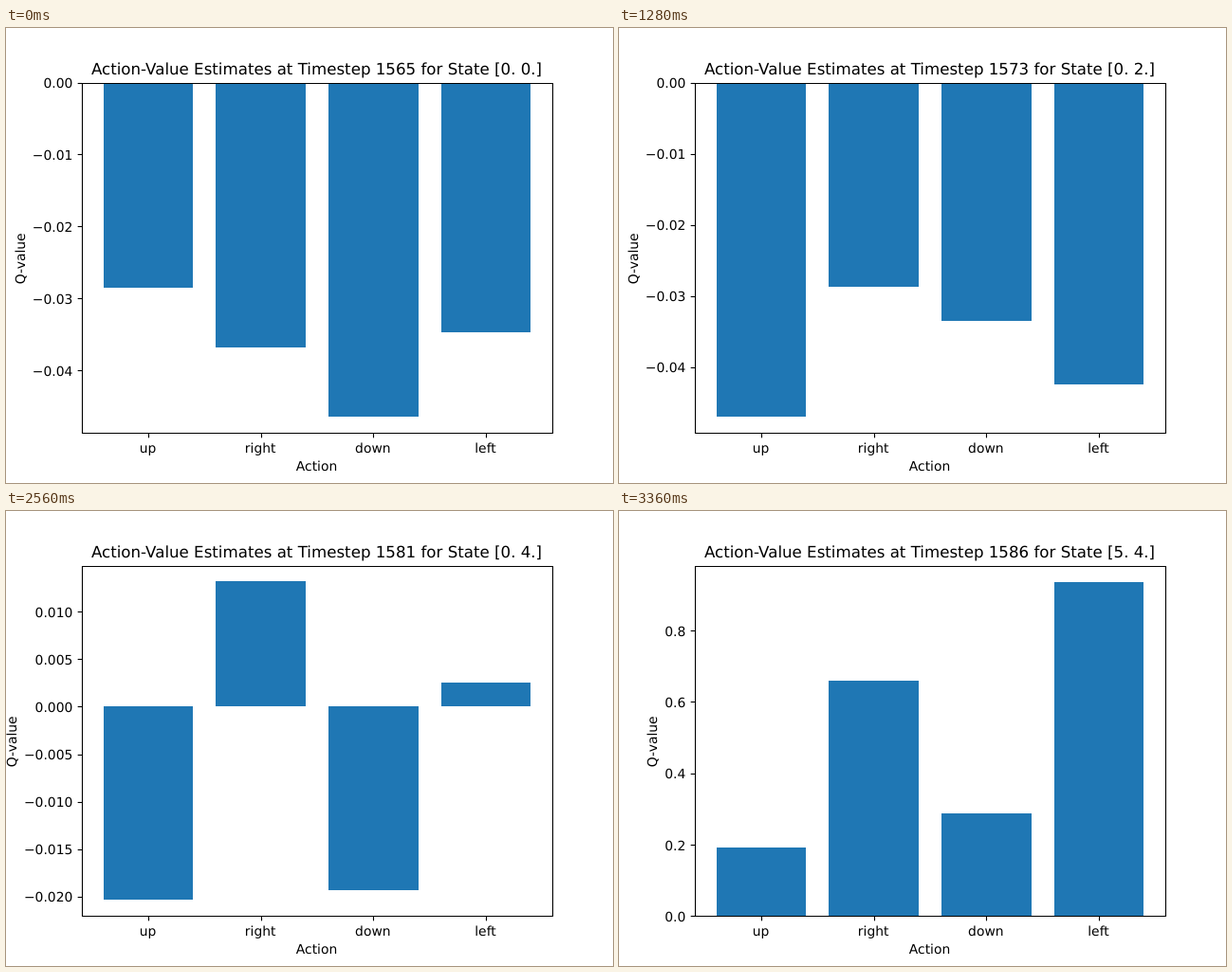
An HTML page that plays this animation: 640x480 px, repeating every 3520 ms.

```html
<!DOCTYPE html>
<html lang="en">
<head>
<meta charset="utf-8">
<title>Action values</title>
<style>
  html, body { margin: 0; width: 100%; height: 100%; overflow: hidden; background: #fff; }
  svg { display: block; width: 640px; height: 480px; }
  text { font: 13.889px "DejaVu Sans", sans-serif; text-rendering: geometricPrecision; }
  .title { font-size: 16.667px; }
  .mid { text-anchor: middle; }
  .end { text-anchor: end; }
  .line { fill: none; stroke: #000; stroke-width: 1.11; }
  .bar { fill: #1f77b4; }
</style>
</head>
<body>
<svg id="chart" viewBox="0 0 640 480"></svg>
<script>
const STEP_MS = 160;
const STEPS = 22;
const FIRST_TIMESTEP = 1565;
const ACTIONS = ["up", "right", "down", "left"];
const TOP = 57.6, BOTTOM = 427.2, LEFT = 80, RIGHT = 576;
const UNIT = (RIGHT - LEFT) / 4.18;
const EM = 13.889;

// Key points of the estimates, in thousandths, in the order of ACTIONS
const KEYS = [
  { at: 0, values: [-28.5, -36.8, -46.4, -34.7] },
  { at: 2, values: [-27, -33, -40.4, -33] },
  { at: 3, values: [-27.3, -31.6, -50.6, -34.1] },
  { at: 6, values: [-37, -31, -40, -43.3] },
  { at: 8, values: [-46.9, -28.7, -33.5, -42.4] },
  { at: 12, values: [-31.4, -20.1, -32.5, -9.9] },
  { at: 15, values: [-30.2, 12.5, -24, -2] },
  { at: 16, values: [-20.35, 13.17, -19.3, 2.5] },
  { at: 19, values: [80.4, 434, 57, 244], power: 2 },
  { at: 21, values: [192, 659, 287.6, 935.7] }
];
// Steps at which the agent moves on, first down the grid, then across it
const DOWN_MOVES = [3, 6, 14, 16];
const LAST_DOWN = 16;

const chart = document.getElementById("chart");
const centre = i => LEFT + (i + 0.59) * UNIT;
const snap = v => Math.round(v) + 0.5;
const line = d => `<path class="line" d="${d}"/>`;
const text = (x, y, cls, str, extra = "") =>
  `<text x="${x}" y="${y}" class="${cls}" ${extra}>${str}</text>`;

function estimates(k) {
  const next = Math.max(1, KEYS.findIndex(key => key.at >= k));
  const a = KEYS[next - 1], b = KEYS[next];
  const t = ((k - a.at) / (b.at - a.at)) ** (b.power || 1);
  return a.values.map((v, i) => v + (b.values[i] - v) * t);
}

function stateName(k) {
  const across = Math.max(0, k - LAST_DOWN);
  const down = DOWN_MOVES.filter(move => move <= k).length;
  return `[${across}. ${down}.]`;
}

function limits(values) {
  const lo = Math.min(0, ...values), hi = Math.max(0, ...values);
  const pad = (hi - lo) * 0.05;
  return [lo < 0 ? lo - pad : 0, hi > 0 ? hi + pad : 0];
}

// Smallest round step that gives at most nine intervals
function tickStep(range) {
  const raw = range / 9;
  const power = 10 ** Math.floor(Math.log10(raw));
  return [1, 2, 2.5, 5, 10].find(m => m * power >= raw) * power;
}

function draw(k) {
  const values = estimates(k);
  const [lo, hi] = limits(values);
  const toY = v => TOP + (hi - v) / (hi - lo) * (BOTTOM - TOP);
  const step = tickStep(hi - lo);
  const decimals = step % 10 ? 3 : step % 100 ? 2 : 1;
  let out = "";

  values.forEach((v, i) => {
    const x0 = Math.round(centre(i) - 0.4 * UNIT), x1 = Math.round(centre(i) + 0.4 * UNIT);
    const y0 = Math.round(toY(Math.max(v, 0))), y1 = Math.round(toY(Math.min(v, 0)));
    out += `<rect class="bar" x="${x0}" y="${y0}" width="${x1 - x0}" height="${y1 - y0}"/>`;
    out += line(`M${snap(centre(i))} 427.5v4.86`);
    out += text(centre(i) - 0.5, 448, "mid", ACTIONS[i]);
  });

  for (let n = Math.ceil(lo / step); n <= Math.floor(hi / step); n++) {
    const y = toY(n * step);
    const label = (n < 0 ? "\u2212" : "") + Math.abs(n * step / 1000).toFixed(decimals);
    out += line(`M80.5 ${snap(y)}h-4.86`);
    out += text(70.3, Math.round(y + 5.6), "end", label);
  }

  out += line("M80.5 58.5H576.5V427.5H80.5Z");

  const labelWidth = EM * (0.636 * (decimals + 1) + 0.318 + (lo < 0 ? 0.838 : 0));
  const labelX = Math.round(70.3 - labelWidth - 8);
  out += text(0, 0, "mid", "Q-value", `transform="translate(${labelX} 243.3) rotate(-90)"`);
  out += text(327.5, 467, "mid", "Action");
  out += text(327.5, 49, "mid title",
    `Action-Value Estimates at Timestep ${FIRST_TIMESTEP + k} for State ${stateName(k)}`);
  chart.innerHTML = out;
}

let shown = -1;
const start = performance.now();
function tick() {
  const k = Math.floor((performance.now() - start) / STEP_MS) % STEPS;
  if (k !== shown) draw(shown = k);
  requestAnimationFrame(tick);
}
tick();
</script>
</body>
</html>
```
